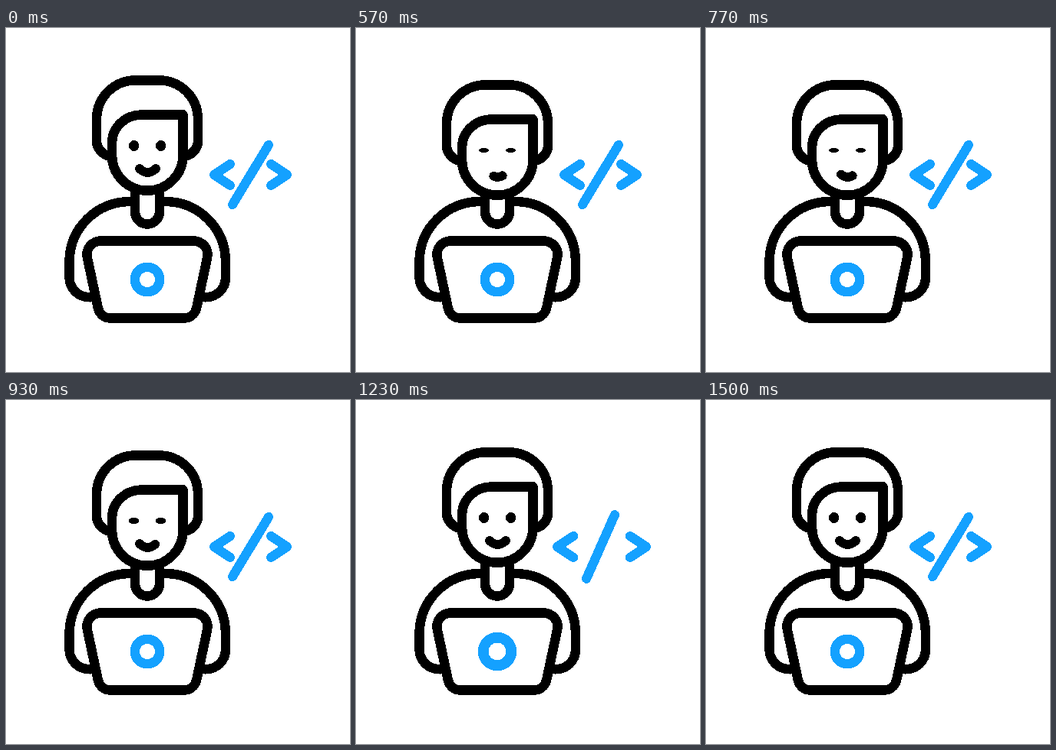
Write an HTML page that moves like this. It is 448x450 px and loops after 1530 ms.

```html
<!DOCTYPE html>
<html lang="en">
<head>
<meta charset="utf-8">
<title>Developer at a laptop</title>
<style>
  html, body { margin: 0; width: 100%; height: 100%; overflow: hidden; background: #fff; }
  svg { display: block; width: 100vw; height: 100vh; shape-rendering: crispEdges; }
  .ink, .code { stroke-width: 12.5; stroke-linecap: round; stroke-linejoin: round; }
  .ink { fill: #fff; stroke: #000; }
  .code { fill: none; stroke: #14a1ff; stroke-width: 12.2; }
  .open { fill: none; }
</style>
</head>
<body>
<svg viewBox="0 0 448 450">
  <g class="ink">
    <path class="open" d="M110 352.3C94 352.3 82.5 341 82.5 326V306C82.5 262 118 227 162 227"/>
    <path class="open" d="M259 352.3C275 352.3 286 341 286 326V306C286 262 251 227 207 227"/>
    <path d="M168 212V240.5A16 16 0 0 0 200 240.5V212"/>
    <path d="M125 278.3H243C256 278.3 265 289 262 301L248 367C246 374 240 379.4 233 379.4H135C128 379.4 122 374 120 367L106 301C103 289 112 278.3 125 278.3Z"/>
  </g>
  <g id="head">
    <g class="ink">
      <path class="open" d="M136 168C126 166 118 158 118 148V120C118 90 141 68.3 170 68.3H198C227 68.3 250 90 250 120V148C250 158 242 166 233 168"/>
      <path d="M230.5 113.3H178C156 113.3 138 129 138 151V166.5A46.25 46.25 0 0 0 230.5 166.5Z"/>
    </g>
    <ellipse id="eyeL" cx="166.7" cy="154" rx="6.8" ry="7"/>
    <ellipse id="eyeR" cx="201.7" cy="154" rx="6.8" ry="7"/>
    <path id="mouth" fill="none" stroke="#000" stroke-width="11.8" stroke-linecap="round"/>
  </g>
  <g class="code">
    <circle id="ring" cx="184" cy="329" r="16.3"/>
    <path id="left" d="M292 178L271 192L292 206"/>
    <path id="right" d="M345 178L366 192L345 206"/>
    <path id="slash" d="M342 153L295 231"/>
  </g>
</svg>
<script>
const LOOP = 1530, FPS = 30;
const $ = id => document.getElementById(id);
const set = (id, attrs) => {
  for (const name in attrs) $(id).setAttribute(name, attrs[name]);
};
const span = (t, a, b) => Math.min(1, Math.max(0, (t - a) / (b - a)));
const easeOut = x => 1 - (1 - x) ** 3;
const pulse = (t, a, b) => Math.sin(Math.PI * span(t, a, b)) ** 2;

// Smile curve, shown only between parameters a and b.
function smile(a, b) {
  const at = u => [174 + 21 * u, 184 + 20 * u * (1 - u)];
  const [x0, y0] = at(a), [x1, y1] = at(b);
  const cx = (x0 + x1) / 2;
  const cy = y0 + (cx - x0) * (1 - 2 * a) * 20 / 21;
  return `M${x0} ${y0}Q${cx} ${cy} ${x1} ${y1}`;
}

// t counts ticks of 1/30 s.
function draw(t) {
  const nod = easeOut(span(t, 10, 18)) - easeOut(span(t, 27, 35));
  const ry = 7 - 4.1 * nod;
  set('head', { transform: `translate(0 ${6 * nod})` });
  set('eyeL', { ry });
  set('eyeR', { ry });

  const trimL = 0.25 * (easeOut(span(t, 10, 17)) - span(t, 17, 26));
  const trimR = 0.2 * (span(t, 11, 17) - span(t, 23, 29));
  set('mouth', { d: smile(trimL, 1 - trimR) });

  const push = pulse(t, 35, 42);
  const grow = 1 + 0.2 * push;
  set('ring', { r: 16.3 * grow, style: `stroke-width: ${12.3 * grow}` });
  set('left', { transform: `translate(${-14.5 * push} 0)` });
  set('right', { transform: `translate(${19.5 * push} 0)` });
  set('slash', { transform: `rotate(${-21 * pulse(t, 35, 45)} 318.5 192)` });
}

const start = performance.now();
function tick() {
  const ms = (performance.now() - start) % LOOP;
  draw(Math.floor(ms * FPS / 1000 + 0.1001));
  requestAnimationFrame(tick);
}
tick();
</script>
</body>
</html>
```
